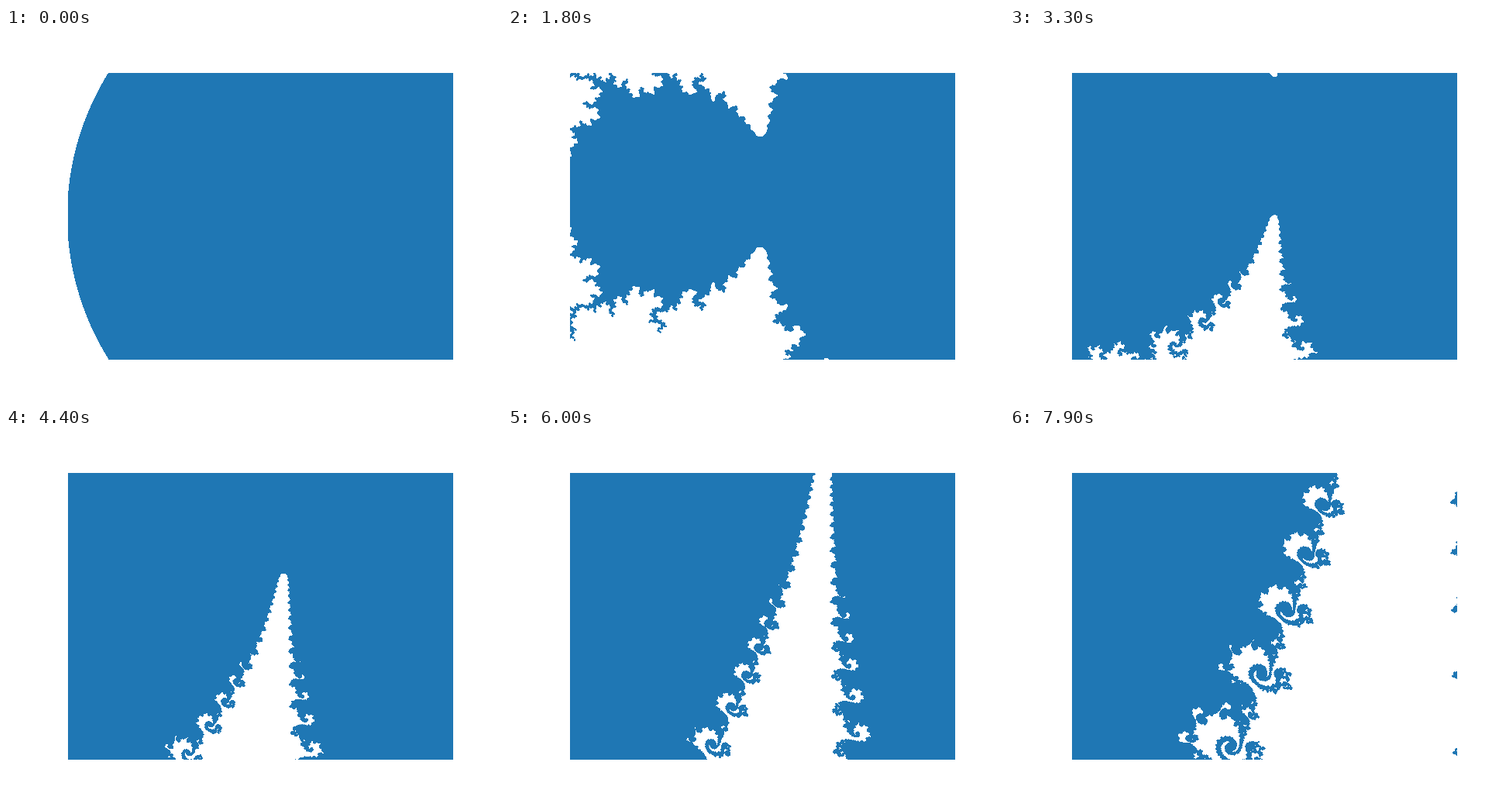
These frames come from a looping animation (640x480 px, 8000 ms). An HTML page with a canvas:

```html
<!DOCTYPE html>
<html>
<head>
<meta charset="utf-8">
<title>Mandelbrot zoom</title>
<style>
html, body { margin: 0; width: 100%; height: 100%; overflow: hidden; background: #fff; }
canvas { position: absolute; left: 80px; top: 58px; }
</style>
</head>
<body>
<canvas id="plot" width="497" height="370"></canvas>
<script>
const canvas = document.getElementById('plot');
const ctx = canvas.getContext('2d');
const W = canvas.width, H = canvas.height;
const STEP = 100, COUNT = 80, SHRINK = 0.95;
const focus = { re: -0.7713, im: 0.1102 };
const BLUE = 0xffb4771f; // #1f77b4 in little-endian ABGR

// One spare pixel on every side lets markers overlap the edge.
const ROW = W + 2;
const image = ctx.createImageData(ROW, H + 2);
const pixels = new Uint32Array(image.data.buffer);
const centreMark = [0, -1, 1, -ROW, ROW];
const cornerMark = [0, -1, -ROW, -ROW - 1];

function bounded(re, im, limit) {
  const im2 = im * im, a = re - 0.25, q = a * a + im2;
  if (q * (q + a) < im2 / 4 || (re + 1) ** 2 + im2 < 1 / 16) return true;
  let x = re, y = im;
  for (let i = 0; i < limit; i++) {
    const xx = x * x, yy = y * y;
    if (xx + yy > 4) return false;
    y = 2 * x * y + im;
    x = xx - yy + re;
  }
  return true;
}

function stamp(mark, p) {
  for (const offset of mark) pixels[p + offset] = BLUE;
}

function draw(step) {
  const zoom = SHRINK ** step, limit = step + 1;
  const dx = 2.5 / 496 * zoom, dy = 2 / 369.6 * zoom;
  const left = focus.re + (-2 - focus.re) * zoom + 0.5 * dx;
  const top = focus.im + (-1 - focus.im) * zoom + 0.9 * dy;
  pixels.fill(0xffffffff);
  for (let j = 0; j <= H; j++) {
    for (let i = 0; i <= W; i++) {
      const p = (j + 1) * ROW + i + 1;
      const re = left + i * dx, im = top + j * dy;
      if (bounded(re, im, limit)) stamp(centreMark, p);
      if (bounded(re - dx / 2, im - dy / 2, limit)) stamp(cornerMark, p);
    }
  }
  ctx.putImageData(image, -1, -1);
}

let shown = -1;
const start = performance.now();
function tick() {
  const step = Math.floor((performance.now() - start) / STEP) % COUNT;
  if (step !== shown) draw(shown = step);
  requestAnimationFrame(tick);
}
tick();
</script>
</body>
</html>
```
